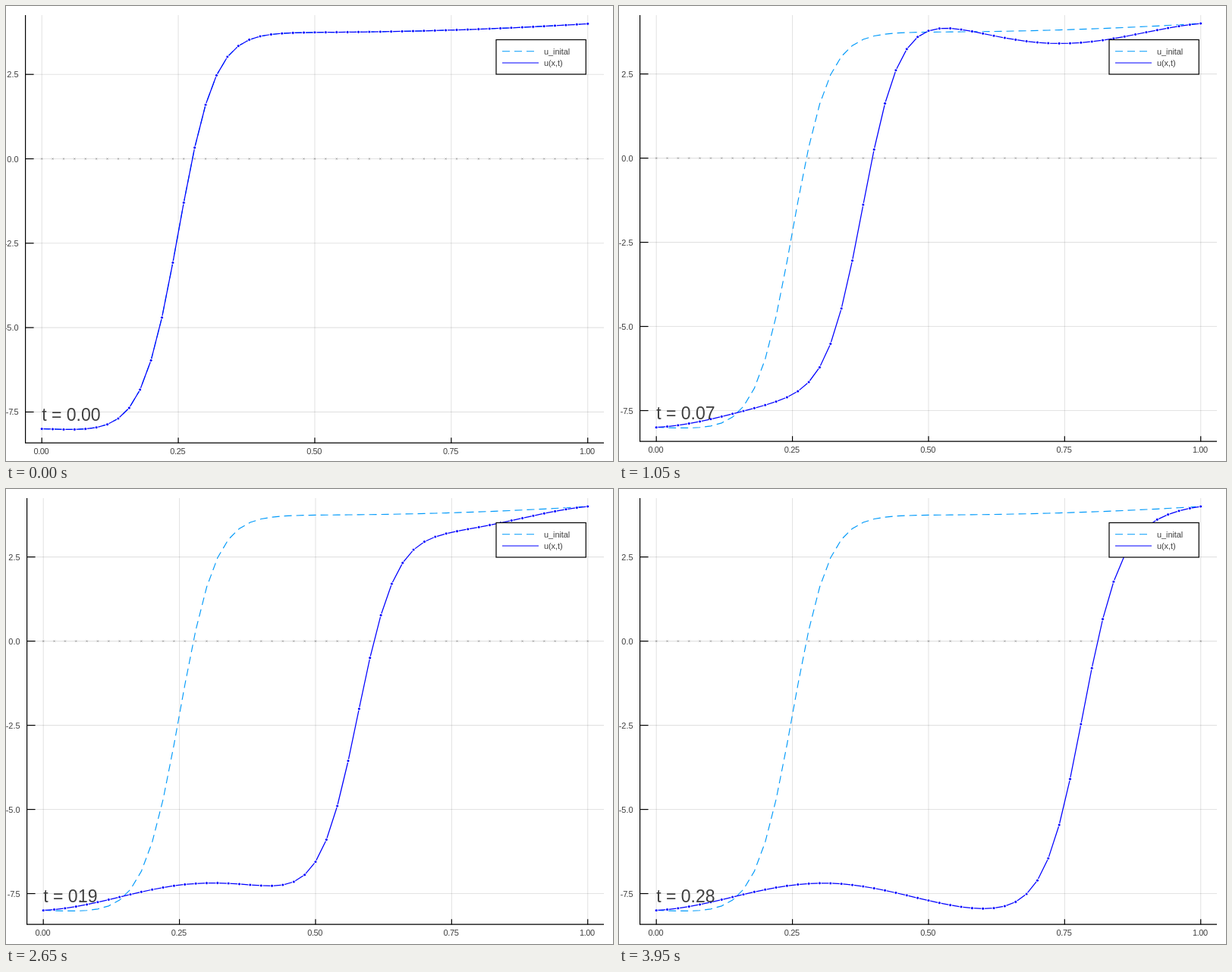
These frames come from a looping animation (800x600 px, 4000 ms). An HTML page with a canvas:

```html
<!DOCTYPE html>
<html lang="en">
<head>
<meta charset="utf-8">
<title>Moving front</title>
<style>
html, body { margin: 0; width: 100%; height: 100%; overflow: hidden; background: #fff; }
canvas { display: block; }
</style>
</head>
<body>
<canvas id="plot" width="800" height="600"></canvas>
<script>
const ctx = document.getElementById("plot").getContext("2d");
const FRAMES = 80, FRAME_MS = 50, DT = 0.0035, SUBSTEPS = 10;
const N = 50, H = 1 / N, EPS = 0.2;
const RIGHT = 788, TOP = 12, X_END = 766.7;
const BLUE = "#0000ff", SKY = "#009afa", INK = "#404040";
const KERN = { ".1": -0.26, "11": -0.2, "7.": -0.18 };

// The opening frame has slightly smaller margins than the rest.
const FIRST = { left: 25.6, bottom: 576.2, x0: 47.2, y0: 201.5, unit: 44.52 };
const REST = { left: 27.6, bottom: 574.2, x0: 49.2, y0: 200.6, unit: 44.39 };

const grid = Array.from({ length: N + 1 }, (_, i) => i * H);
const initial = grid.map(x => x * x - x - 2 + 6 * Math.tanh(15 * (x - 0.25)));
const q = grid.map(x => 4 * Math.sin(3 * Math.PI * x));

// u_t = eps u_xx + u u_x - q u, with fixed ends
function rate(u) {
  return u.map((v, i) => i === 0 || i === N ? 0 :
    EPS * (u[i + 1] - 2 * v + u[i - 1]) / (H * H) +
    v * (u[i + 1] - u[i - 1]) / (2 * H) - q[i] * v);
}

function step(u, dt) {
  const add = (k, s) => u.map((v, i) => v + s * k[i]);
  const a = rate(u);
  const b = rate(add(a, dt / 2));
  const c = rate(add(b, dt / 2));
  const d = rate(add(c, dt));
  return u.map((v, i) => v + dt / 6 * (a[i] + 2 * b[i] + 2 * c[i] + d[i]));
}

function solve() {
  let u = initial.slice();
  u[0] = -8;
  u[N] = 4;
  const states = [u];
  while (states.length < FRAMES) {
    for (let k = 0; k < SUBSTEPS; k++) u = step(u, DT / SUBSTEPS);
    states.push(u);
  }
  return states;
}

function line(points, color, width = 1, dash = []) {
  ctx.beginPath();
  points.forEach(([x, y]) => ctx.lineTo(x, y));
  ctx.strokeStyle = color;
  ctx.lineWidth = width;
  ctx.setLineDash(dash);
  ctx.stroke();
  ctx.setLineDash([]);
}

// align: 0 = start, 0.5 = centre, 1 = end
function label(text, x, y, size, align = 0, spacing = 0) {
  ctx.font = `${size}px "Liberation Sans", Arial, sans-serif`;
  ctx.fontKerning = "none";
  ctx.fillStyle = INK;
  let width = 0;
  const offsets = [...text].map((ch, i) => {
    if (i) width += (KERN[text[i - 1] + ch] || 0) * size + spacing;
    const at = width;
    width += ctx.measureText(ch).width;
    return at;
  });
  [...text].forEach((ch, i) => ctx.fillText(ch, x - width * align + offsets[i], y));
}

function axes(box, px, py) {
  const xs = [0, 0.25, 0.5, 0.75, 1], ys = [2.5, 0, -2.5, -5, -7.5];
  const faint = "rgba(0,0,0,0.11)";
  xs.forEach(x => line([[px(x), TOP], [px(x), box.bottom]], faint, 1.1));
  ys.forEach(y => line([[box.left, py(y)], [RIGHT, py(y)]], faint, 1.1));
  line([[box.left, TOP], [box.left, box.bottom], [RIGHT, box.bottom]], "#000", 1.2);
  xs.forEach(x => {
    line([[px(x), box.bottom], [px(x), box.bottom - 7]], "#000", 1.2);
    label(x.toFixed(2), px(x) - 0.6, box.bottom + 14.8, 11, 0.5, -0.4);
  });
  ys.forEach(y => {
    line([[box.left, py(y)], [box.left + 11, py(y)]], "#000", 1.2);
    label(y.toFixed(1), box.left - 9, py(y) + 4, 11, 1);
  });
}

function legend() {
  ctx.fillStyle = "#fff";
  ctx.fillRect(646, 44.5, 118.3, 45.5);
  ctx.strokeStyle = "#000";
  ctx.lineWidth = 1.2;
  ctx.strokeRect(646, 44.5, 118.3, 45.5);
  line([[654, 59.7], [702, 59.7]], SKY, 1.1, [10, 6]);
  line([[654, 75], [702, 75]], BLUE, 1.1);
  label("u_inital", 709, 63.8, 11, 0, -0.1);
  label("u(x,t)", 709, 79, 11, 0, -0.1);
}

function draw(n) {
  const box = n === 0 ? FIRST : REST;
  const px = x => box.x0 + x * (X_END - box.x0);
  const py = u => box.y0 - u * box.unit;
  const place = u => u.map((v, i) => [px(grid[i]), py(v)]);

  ctx.fillStyle = "#fff";
  ctx.fillRect(0, 0, 800, 600);
  axes(box, px, py);

  line(place(initial), SKY, 1.15, [10, 6]);

  const curve = place(states[n]);
  line(curve, BLUE, 1.25);
  curve.forEach(([x, y]) => {
    ctx.beginPath();
    ctx.arc(x, y, 2, 0, 2 * Math.PI);
    ctx.fillStyle = BLUE;
    ctx.fill();
    ctx.strokeStyle = "#fff";
    ctx.lineWidth = 1;
    ctx.stroke();
  });

  grid.forEach(g => {
    const x = px(g), y = py(0), r = 1.2;
    line([[x - r, y - r], [x + r, y + r]], "rgba(0,0,0,0.45)", 0.6);
    line([[x - r, y + r], [x + r, y - r]], "rgba(0,0,0,0.45)", 0.6);
  });

  const time = (n * DT + 1e-9).toFixed(2);
  label("t = " + time, px(0), py(-7.5) + 11.8, 23);
  legend();
}

const states = solve();
const start = performance.now();
let shown = -1;

function tick() {
  const n = Math.floor((performance.now() - start) / FRAME_MS) % FRAMES;
  if (n !== shown) draw(shown = n);
  requestAnimationFrame(tick);
}
tick();
</script>
</body>
</html>
```
